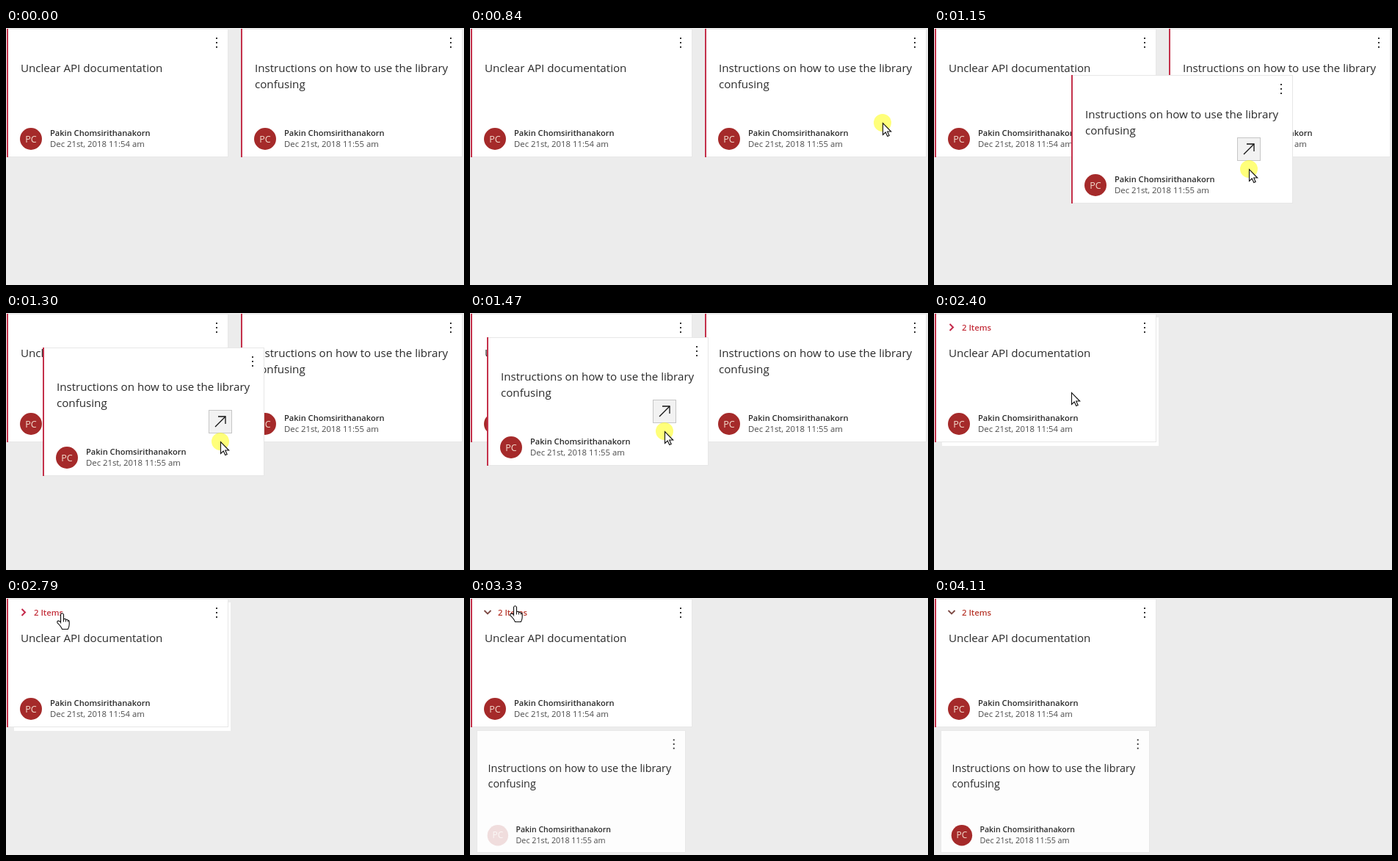
Write an HTML page with a canvas that moves like this. It is 624 by 350 pixels and loops after 5.12 s.

```html
<!DOCTYPE html>
<html lang="en">
<head>
<meta charset="utf-8">
<title>Grouping feedback cards</title>
<style>
  html, body { margin: 0; width: 100%; height: 100%; overflow: hidden; background: #ececec; }
  canvas { display: block; }
</style>
</head>
<body>
<canvas id="stage" width="624" height="350"></canvas>
<script>
const ctx = document.getElementById('stage').getContext('2d');
const FONT = '"Open Sans", "Noto Sans", sans-serif';
const AUTHOR = 'Pakin Chomsirithanakorn';
const CARD_W = 302, CARD_H = 175;

const LOOP = 5120;   // ms
const TICK = 77.3;   // the screen refreshes about 13 times a second
const LEAD = 16;     // ms

// Events, in ticks
const ENTER = 4, PRESS = 11, LIFT = 13, DROP = 25, STACK = 30,
  HOVER = 36, CLICK = 41, OPEN = 43, SHOWN = 48, LEAVE = 53;

const first = { lines: ['Unclear API documentation'], date: 'Dec 21st, 2018 11:54 am' };
const second = {
  lines: ['Instructions on how to use the library', 'confusing'],
  date: 'Dec 21st, 2018 11:55 am'
};

const ARROW = new Path2D('M.5.5V16.5L4.2 13 6.8 18.6 9.2 17.5 6.7 12H11.7Z');
const HAND = new Path2D('M-.5 12V1.5q2-3.5 4 0V8q2.6-1.6 3 .6q2.4-1 2.7.9q2-.4 2 1.6' +
  'V15q0 3-1.8 6.5H1.5Q0 17.5-5 12.8q-.8-3 2-2.6Q-1 10.8-.5 12Z');

const START = { x: 546, y: 252 };
const GRAB = { x: 562, y: 129 };

// Pointer moves; bow bends the path downwards.
const MOVES = [
  { from: 4, to: 8, ...GRAB },
  { from: 12.34, to: 18.06, x: 265, y: 161.3, bow: 49.5 },
  { from: 26, to: 28, x: 215, y: 129 },
  { from: 29, to: HOVER, x: 75, y: 21 },
  { from: HOVER, to: 38, x: 60, y: 11 },
  { from: 51, to: 52, x: 35, y: 12 }
];

const within = (t, a, b) => t >= a && t < b;
const progress = (t, a, b) => Math.min(1, Math.max(0, (t - a) / (b - a)));
const smooth = p => p * p * (3 - 2 * p);

function pointerAt(t) {
  let { x, y } = START;
  for (const m of MOVES) {
    const e = smooth(progress(t, m.from, m.to));
    x += (m.x - x) * e;
    y += (m.y - y) * e + 4 * e * (1 - e) * (m.bow || 0);
  }
  return [Math.round(x), Math.round(y)];
}

function rect(x, y, w, h, color) {
  ctx.fillStyle = color;
  ctx.fillRect(x, y, w, h);
}

function disc(x, y, r, color) {
  ctx.fillStyle = color;
  ctx.beginPath();
  ctx.arc(x, y, r, 0, Math.PI * 2);
  ctx.fill();
}

function text(str, x, y, size, color, weight = 400, align = 'left') {
  ctx.font = `${weight} ${size}px ${FONT}`;
  ctx.textAlign = align;
  ctx.fillStyle = color;
  ctx.fillText(str, x, y);
}

function line(points, color, width) {
  ctx.strokeStyle = color;
  ctx.lineWidth = width;
  ctx.beginPath();
  points.forEach(([x, y]) => ctx.lineTo(x, y));
  ctx.stroke();
}

function content(card, veil = 0) {
  for (let i = 0; i < 3; i++) rect(285, 12 + 6 * i, 2, 2, '#333');
  card.lines.forEach((s, i) => text(s, 19, 59 + 22 * i, 15.15, '#2a2a2a'));
  disc(33, 150, 15, '#a52a2a');
  text('PC', 33, 154.5, 12.6, '#f3dccd', 400, 'center');
  if (veil) disc(33, 150, 16, `rgba(253,253,253,${veil})`);
  text(AUTHOR, 59, 146, 11.1, '#2b2b2b', 600);
  text(card.date, 59, 161, 11.35, '#4c4c4c');
}

function drawCard(card, x, y) {
  ctx.save();
  ctx.translate(x, y);
  rect(0, 0, CARD_W, CARD_H, '#e7e7e7');
  rect(2, 1, CARD_W - 3, CARD_H - 2, '#fff');
  rect(0, 0, 2, CARD_H, '#c4314b');
  content(card);
  ctx.restore();
}

function drawChild(card, veil) {
  rect(9, 180, 285, 167, '#e8e8e8');
  rect(10, 181, 283, 165, '#fdfdfd');
  ctx.save();
  ctx.translate(6.6, 181);
  ctx.scale(0.948, 0.948);
  content(card, veil);
  ctx.restore();
}

function drawGroupLabel(open) {
  if (open) line([[19.5, 17], [24, 21.5], [28.5, 17]], '#7d4a44', 1.8);
  else line([[21.5, 15], [26, 19.5], [21.5, 24]], '#c4284a', 2);
  text('2 Items', 38, 24, 11.3, open ? '#b8392d' : '#c4303c', 600);
}

function drawDragBadge(x, y) {
  rect(x - 16, y - 43, 32, 32, '#c6c6c6');
  rect(x - 15, y - 42, 30, 30, '#f2f2f2');
  line([[x - 7, y - 20], [x + 7, y - 34]], '#111', 1.3);
  line([[x - 3, y - 34], [x + 7, y - 34], [x + 7, y - 24]], '#111', 1.3);
}

function drawPointer(shape, x, y) {
  ctx.save();
  ctx.translate(x, y);
  ctx.fillStyle = '#fff';
  ctx.fill(shape);
  ctx.strokeStyle = '#111';
  ctx.lineWidth = 1.1;
  ctx.stroke(shape);
  if (shape === HAND) {
    for (let i = 0; i < 3; i++) line([[3.5 + 3 * i, 7.5 + i], [3.5 + 3 * i, 11.5]], '#111', 1);
  }
  ctx.restore();
}

function draw(t) {
  const [px, py] = pointerAt(t);
  const grouped = t >= STACK, open = t >= OPEN;

  rect(0, 0, 624, 350, '#ececec');
  if (grouped && !open) rect(11, 6, 295, 175, '#fff');
  drawCard(first, 1, 1);
  if (grouped) drawGroupLabel(open);
  else drawCard(second, 320, 1);
  if (open) drawChild(second, 0.85 * (1 - progress(t, OPEN, SHOWN)));

  if (within(t, LIFT, DROP)) {
    drawCard(second, 320 + px - GRAB.x, 1 + py - GRAB.y);
    drawDragBadge(px, py);
  }
  if (within(t, PRESS, DROP) || within(t, CLICK, OPEN)) disc(px, py, 12, 'rgba(255,255,0,.52)');
  if (within(t, ENTER, LEAVE)) drawPointer(t >= HOVER ? HAND : ARROW, px, py);
}

function loop() {
  const now = performance.now() % LOOP;
  draw(Math.floor((now + LEAD) / TICK));
  requestAnimationFrame(loop);
}
loop();
</script>
</body>
</html>
```
